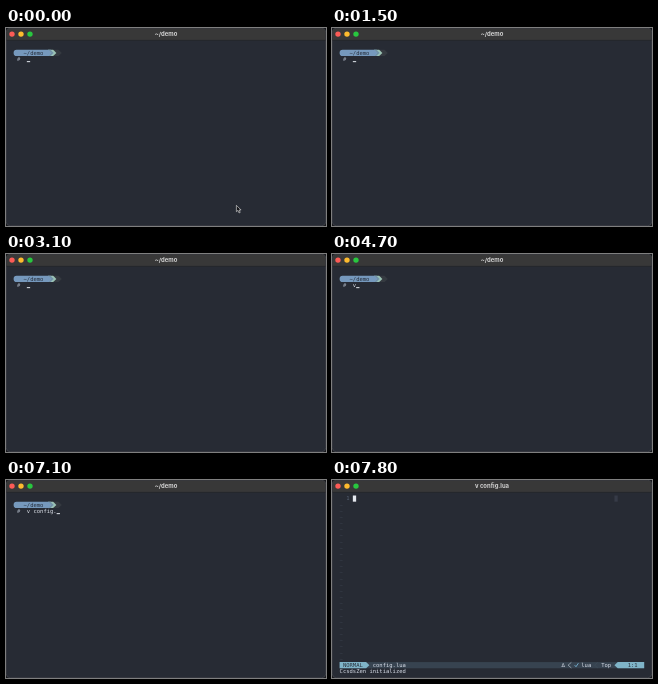
These frames come from a looping animation (320x198 px, 8 s). An HTML page:

```html
<!DOCTYPE html>
<html lang="en">
<head>
<meta charset="utf-8">
<title>Terminal</title>
<style>
html, body { margin: 0; width: 100%; height: 100%; overflow: hidden; background: #17181b; }
svg { display: block; width: 320px; height: 198px; }
text { white-space: pre; }
.mono { font: 5.5px "DejaVu Sans Mono", monospace; }
#title { font: 700 5.9px Inter, sans-serif; text-anchor: middle; fill: #d3d3d3; }
</style>
</head>
<body>
<svg id="stage" viewBox="0 0 320 198" xmlns="http://www.w3.org/2000/svg">
  <rect x=".25" y=".25" width="319.5" height="197.5" rx="4" fill="#272b34" stroke="#50535a" stroke-width=".5"/>
  <path d="M.5 12.3V4.5a4 4 0 0 1 4-4h311a4 4 0 0 1 4 4v7.8z" fill="#383838"/>
  <path d="M.5 12.3h319" stroke="#1b1d21" stroke-width=".5"/>
  <circle cx="6" cy="6.1" r="2.7" fill="#fc5b56"/>
  <circle cx="15" cy="6.1" r="2.7" fill="#fdbb2e"/>
  <circle cx="24" cy="6.1" r="2.7" fill="#28c73f"/>
  <text id="title" x="160" y="8.2"></text>

  <g id="shell" class="mono">
    <path d="M48 21.8h4.6l3.2 3.1-3.2 3.1H48z" fill="#353a40"/>
    <path d="M42 21.8h5.2l3.2 3.1-3.2 3.1H42z" fill="#9cc4b4"/>
    <path d="M10.7 21.8h34l3.1 3.1-3.1 3.1h-34a3.1 3.1 0 0 1 0-6.2z" fill="#7699bd"/>
    <path d="M43.6 22.1l2.8 2.8-2.8 2.8" fill="none" stroke="#6f8d80" stroke-width=".7"/>
  </g>

  <g id="editor" class="mono"></g>
  <text id="command" class="mono" fill="#dfe4ec"></text>
  <text id="message" class="mono" fill="#d8dee9"></text>
  <rect id="caret" width="3.3" height="1" fill="#e4e8ee"/>
  <path id="mouse" d="M0 0v6.4l1.5-1.3 1.1 2.5 1.2-.5-1.1-2.4h2z" fill="#15161a" stroke="#e8e8e8" stroke-width=".6"/>
</svg>
<script>
const LOOP = 8000, CELL = 3.311, ROW = 6.17, LEFT = 7.6, TOP = 15.5;
const NS = "http://www.w3.org/2000/svg";
const el = id => document.getElementById(id);
const colX = c => LEFT + c * CELL;
const rowY = r => TOP + r * ROW;
const baseY = r => rowY(r) + 4.9;

function add(parent, tag, attrs, content = "") {
  const node = document.createElementNS(NS, tag);
  for (const key in attrs) node.setAttribute(key, attrs[key]);
  node.textContent = content;
  parent.append(node);
}

function write(parent, col, row, content, fill) {
  add(parent, "text", { x: colX(col), y: baseY(row), fill }, content);
}

function move(node, x, y) {
  node.setAttribute("x", x);
  node.setAttribute("y", y);
}

function show(node, on) {
  node.style.display = on ? "" : "none";
}

const shell = el("shell"), editor = el("editor");
write(shell, 3, 1, "~/demo", "#252d3a");
write(shell, 1, 2, "#", "#a4adb9");

function buildEditor() {
  add(editor, "rect", { x: colX(83), y: TOP, width: CELL, height: ROW, fill: "#363b47" });
  write(editor, 2, 0, "1", "#566171");
  for (let r = 1; r < 27; r++) write(editor, 0, r, "~", "#3c4350");

  const y = rowY(27), mid = y + ROW / 2, end = y + ROW;
  add(editor, "rect", { x: LEFT, y, width: 92 * CELL, height: ROW, fill: "#374350" });
  add(editor, "path", { d: `M${LEFT} ${y}H${colX(8)}L${colX(9)} ${mid}L${colX(8)} ${end}H${LEFT}z`, fill: "#7fb4c8" });
  add(editor, "path", { d: `M${colX(92)} ${y}H${colX(84)}L${colX(83)} ${mid}L${colX(84)} ${end}H${colX(92)}z`, fill: "#7fb4c8" });
  write(editor, 1, 27, "NORMAL", "#29323d");
  write(editor, 10, 27, "config.lua", "#d8dee9");
  write(editor, 67, 27, "∆", "#d8dee9");
  add(editor, "path", { d: `M${colX(70)} ${y + .3}L${colX(69)} ${mid}L${colX(70)} ${end - .3}`, fill: "none", stroke: "#c5ced9", "stroke-width": .6 });
  add(editor, "path", { d: `M${colX(71)} ${mid}l1.3 1.6 2.4-3.6`, fill: "none", stroke: "#6fa6c4", "stroke-width": 1 });
  write(editor, 73, 27, "lua", "#d8dee9");
  add(editor, "path", { d: `M${colX(78)} ${y + .3}L${colX(77)} ${mid}L${colX(78)} ${end - .3}`, fill: "none", stroke: "#465361", "stroke-width": .4 });
  write(editor, 79, 27, "Top", "#d8dee9");
  write(editor, 87, 27, "1:1", "#29323d");
}
buildEditor();

const LINE = "v config.lua";
// Time of each keystroke step and the characters typed by then
const KEYS = [
  [4700, 1], [4800, 2], [5300, 3], [5500, 5], [5600, 6], [5700, 7], [5800, 8],
  [7100, 9], [7200, 10], [7300, 11], [7400, 12]
];
const ENTER = 7500, CLEAR = 7600, OPEN = 7700, READY = 7800;

move(el("command"), colX(4), baseY(2));
move(el("message"), LEFT, baseY(28));

function render(t) {
  let typed = 0;
  for (const [time, count] of KEYS) if (t >= time) typed = count;

  const inShell = t < CLEAR, inEditor = t >= OPEN;
  show(shell, inShell);
  show(editor, inEditor);
  el("title").textContent = t < ENTER ? "~/demo" : LINE;
  el("command").textContent = inShell ? LINE.slice(0, typed) : "";
  el("message").textContent = t >= READY ? "CcsdsZen initialized" : "";

  const caret = el("caret");
  caret.setAttribute("height", inEditor ? ROW : 1);
  if (inEditor) move(caret, colX(4), TOP);
  else if (!inShell) move(caret, LEFT, rowY(0) + 5.3);
  else if (t >= ENTER) move(caret, LEFT, rowY(3) + 5.3);
  else move(caret, colX(4 + typed), rowY(2) + 5.3);

  const step = Math.floor(t / 100);
  show(el("mouse"), t < 300);
  el("mouse").setAttribute("transform", `translate(${230.4 - step * .3} ${177.3 + step * 2})`);
}

const start = performance.now();
function tick() {
  render((performance.now() - start) % LOOP);
  requestAnimationFrame(tick);
}
render(0);
requestAnimationFrame(tick);
</script>
</body>
</html>
```
